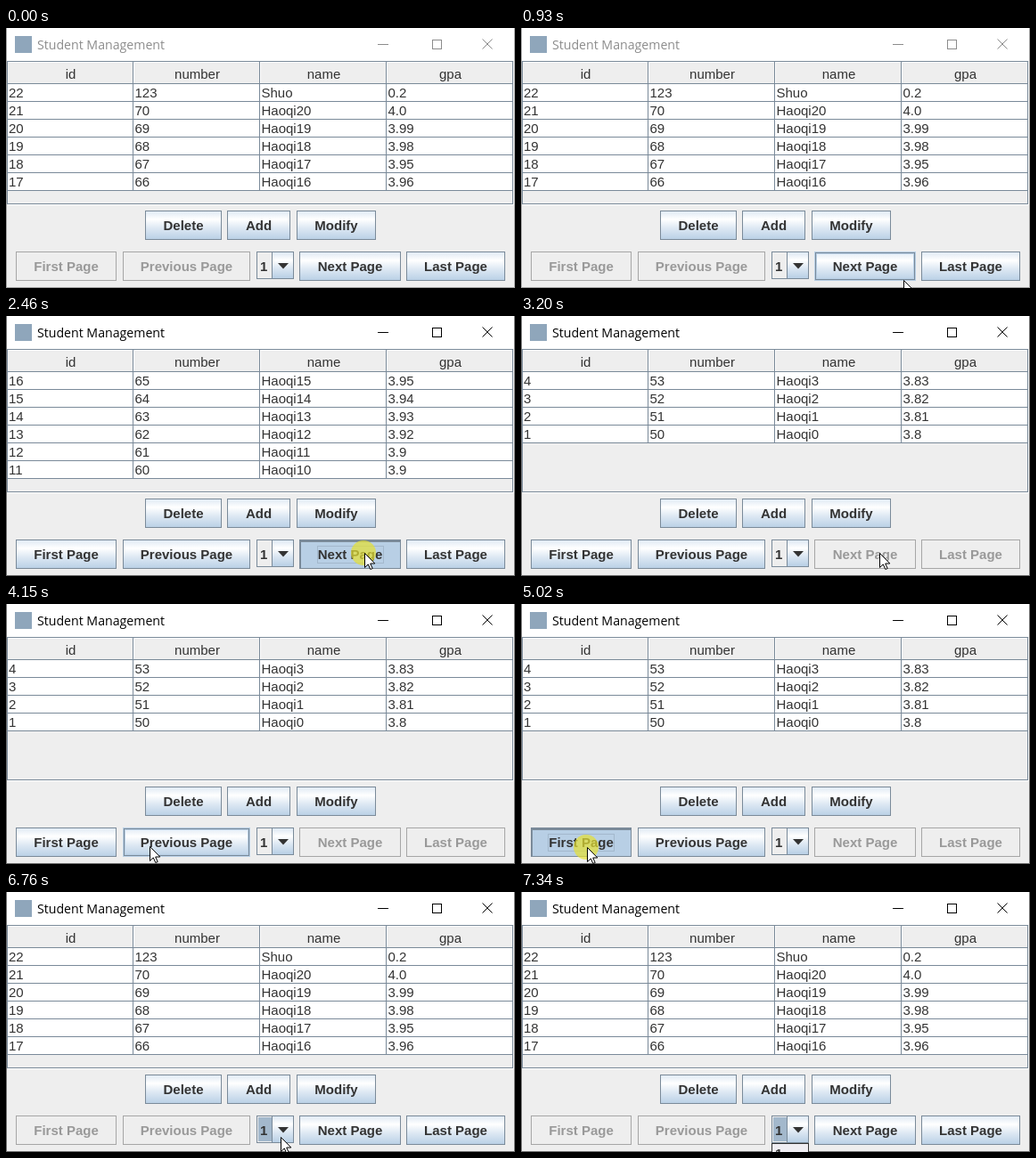
An HTML page for the animation above (8 s loop, 571 by 292 pixels).

```html
<!DOCTYPE html>
<html lang="en">
<head>
<meta charset="utf-8">
<title>Student Management</title>
<style>
html, body { margin: 0; width: 100%; height: 100%; overflow: hidden; background: #eee; }
svg { display: block; width: 571px; height: 292px; font: 15px "Liberation Sans", Arial, sans-serif; }
rect { shape-rendering: crispEdges; }
.title { font: 14.15px "Open Sans", "Noto Sans", sans-serif; }
.bold { font-weight: bold; }
.mid { text-anchor: middle; }
</style>
</head>
<body>
<svg viewBox="0 0 571 292">
  <defs>
    <linearGradient id="ocean" x2="0" y2="1">
      <stop offset="0" stop-color="#dde8f3"/>
      <stop offset=".3" stop-color="#fff"/>
      <stop offset=".6" stop-color="#dde8f3"/>
      <stop offset="1" stop-color="#b8cfe5"/>
    </linearGradient>
  </defs>
  <g id="stage"></g>
</svg>
<script>
const LOOP = 8000;
const DARK = '#7a8a99', PALE = '#b8cfe5', FOCUS = '#a3b8cc', PANEL = '#eee', INK = '#333', OFF = '#999';
const stage = document.getElementById('stage');

const fill = (x, y, w, h, c) => `<rect x="${x}" y="${y}" width="${w}" height="${h}" fill="${c}"/>`;
const frame = (x, y, w, h, c) =>
  `<rect x="${x + .5}" y="${y + .5}" width="${w - 1}" height="${h - 1}" fill="none" stroke="${c}"/>`;
const text = (x, y, s, c = INK, cls = '') => `<text x="${x}" y="${y}" fill="${c}" class="${cls}">${s}</text>`;

// name: x, y, width, text width
const buttons = {
  'Delete': [156, 205, 86, 45],
  'Add': [248, 205, 71, 29],
  'Modify': [326, 205, 89, 48],
  'First Page': [11, 251, 113, 73],
  'Previous Page': [131, 251, 143, 103],
  'Next Page': [329, 251, 114, 73],
  'Last Page': [449, 251, 111, 71]
};
const BUTTON_H = 33;

// Pointer moves: start, end, steps, from, to, upward bend
const moves = [
  [740, 1220, 12, [446, 294], [402, 266], 0],
  [3860, 4310, 12, [402, 266], [76, 274], 0],
  [4610, 4770, 4, [76, 274], [74, 273], 0],
  [6250, 6280, 2, [74, 273], [76, 272], 0],
  [6440, 6760, 8, [76, 272], [308, 275], 6],
  [7260, 7340, 3, [308, 275], [309, 296], 0]
];

// Mouse presses: start, end, target
const presses = [
  [1600, 1720, 'Next Page'],
  [2460, 2590, 'Next Page'],
  [3080, 3200, 'Next Page'],
  [4970, 5130, 'First Page'],
  [6930, 7010, 'combo']
];

function pointer(t) {
  let at = null;
  for (const [start, end, n, from, to, bend] of moves) {
    if (t < start) break;
    const step = Math.min(n, 1 + Math.floor((t - start) / (end - start) * (n - 1) + 1e-6));
    const u = step / n, p = u * u * (3 - 2 * u);
    at = [0, 1].map(i => from[i] + (to[i] - from[i]) * p);
    at[1] -= bend * Math.sin(Math.PI * p);
    at = at.map(Math.round);
  }
  return at;
}

function pageAt(t) {
  if (t >= 5130) return 0;
  return presses.filter(([, end, name]) => name === 'Next Page' && t >= end).length;
}

function focusAt(t) {
  if (t < 1640) return t >= 1600 ? ['Add', 'Next Page'] : [];
  if (t < 3200) return ['Next Page'];
  if (t < 5020) return [];
  return t < 5130 ? ['First Page'] : ['combo'];
}

function titleBar(active) {
  const c = active ? '#000' : '#8c8c8c';
  return fill(0, 0, 571, 37, '#fff') +
    fill(10, 9, 19, 19, '#8fa6bb') +
    text(35, 24, 'Student Management', c, 'title') +
    fill(417, 18, 12, 1, c) + frame(478, 13, 11, 11, c) +
    `<path d="M534.5 12.5l11 11m0-11l-11 11" stroke="${c}"/>`;
}

const special = { 22: '0.2', 21: '4.0', 18: '3.95', 12: '3.9' };

function student(id) {
  const last = id === 22;
  return [id, last ? 123 : id + 49, last ? 'Shuo' : 'Haoqi' + (id - 1), special[id] || (379 + id) / 100];
}

function table(page) {
  const cols = [1, 143, 285, 427, 569];
  let s = fill(0, 37, 571, 255, PANEL);
  ['id', 'number', 'name', 'gpa'].forEach((name, i) => {
    const x = cols[i], w = cols[i + 1] - x;
    s += fill(x + 1, 38, w - 2, 1, '#fff') + fill(x, 38, 1, 24, '#fff') +
      fill(x + w - 1, 38, 1, 24, DARK) + text(x + w / 2 + .5, 57, name, INK, 'mid');
  });
  s += fill(1, 62, 568, 1, DARK);
  const top = 22 - 6 * page, rows = Math.min(6, top);
  s += fill(2, 63, 566, rows * 20, '#fff');
  for (let r = 0; r < rows; r++) {
    const y = 63 + r * 20;
    s += fill(2, y + 19, 566, 1, DARK);
    student(top - r).forEach((v, i) => s += text(cols[i] + (i ? 1.5 : 2), y + 15, v));
  }
  cols.slice(1).forEach(x => s += fill(x - 1, 63, 1, rows * 20, DARK));
  return s + frame(1, 37, 568, 161, DARK) + fill(569, 38, 1, 161, '#fff') + fill(2, 198, 568, 1, '#fff');
}

function button(name, { enabled, pressed, hover, focused }) {
  const [x, y, w, tw] = buttons[name], h = BUTTON_H, mid = x + w / 2;
  let s = fill(x, y, w, h, !enabled ? PANEL : pressed ? PALE : 'url(#ocean)');
  if (enabled && hover && !pressed) {
    s += frame(x, y, w, h, PALE) + frame(x + 1, y + 1, w - 2, h - 2, DARK) + frame(x + 2, y + 2, w - 4, h - 4, PALE);
  } else {
    s += frame(x, y, w, h, enabled ? DARK : '#a6a6a6');
  }
  if (pressed) s += fill(x, y, w, 3, DARK) + fill(x, y, 2, h, DARK);
  if (focused) s += frame(Math.round(mid - tw / 2) - 1, y + 7, tw + 2, 20, FOCUS);
  return s + text(mid, y + 22, name, enabled ? INK : OFF, 'bold mid');
}

function combo(focused, pressed) {
  return fill(281, 251, 42, 31, PANEL) + fill(283, 253, 16, 27, focused ? FOCUS : PANEL) +
    fill(299, 252, 23, 29, pressed ? PALE : 'url(#ocean)') +
    frame(281, 251, 42, 31, DARK) + fill(298, 252, 1, 29, DARK) +
    '<path d="M305 264h12l-6 6.5z" fill="#333"/>' + text(285, 273, '1', INK, 'bold');
}

function popup(lit) {
  return fill(281, 282, 42, 10, lit ? PALE : '#f0eef3') + fill(281, 282, 42, 1, INK) +
    fill(281, 282, 1, 10, INK) + fill(322, 282, 1, 10, INK) + text(285, 299, '1', INK, 'bold');
}

const arrow = ([x, y]) =>
  `<path transform="translate(${x} ${y})" d="M.5 .5V16.5L4.3 12.9 6.8 18.5 9.2 17.5 6.7 12H11.8Z"
    fill="#fff" stroke="#000"/>`;

function picture(t) {
  const at = pointer(t), page = pageAt(t), focus = focusAt(t);
  const press = presses.find(([start, end]) => t >= start && t < end);
  const active = t >= 1600;
  let s = titleBar(active) + table(page);
  for (const name in buttons) {
    const [x, y, w] = buttons[name];
    const back = name === 'First Page' || name === 'Previous Page';
    const ahead = name === 'Next Page' || name === 'Last Page';
    s += button(name, {
      enabled: back ? page > 0 : ahead ? page < 3 : true,
      pressed: !!press && press[2] === name,
      hover: at && at[0] >= x && at[0] < x + w && at[1] >= y && at[1] < y + BUTTON_H,
      focused: focus.includes(name)
    });
  }
  s += combo(focus.includes('combo'), !!press && press[2] === 'combo');
  const edge = active ? '#6e6e6e' : '#a0a0a0';
  s += fill(0, 0, 1, 292, edge) + fill(570, 0, 1, 292, edge) + fill(0, 291, 571, 1, edge);
  if (t >= 6970) s += popup(t < 7340);
  if (press) s += `<circle cx="${at[0] - 1}" cy="${at[1]}" r="14" fill="#e6e032" fill-opacity=".7"/>`;
  if (at) s += arrow(at);
  return s;
}

let shown = '';
function draw(now) {
  const next = picture(now % LOOP);
  if (next !== shown) stage.innerHTML = shown = next;
}

const begin = performance.now();
function tick() {
  draw(performance.now() - begin);
  requestAnimationFrame(tick);
}
tick();
</script>
</body>
</html>
```
